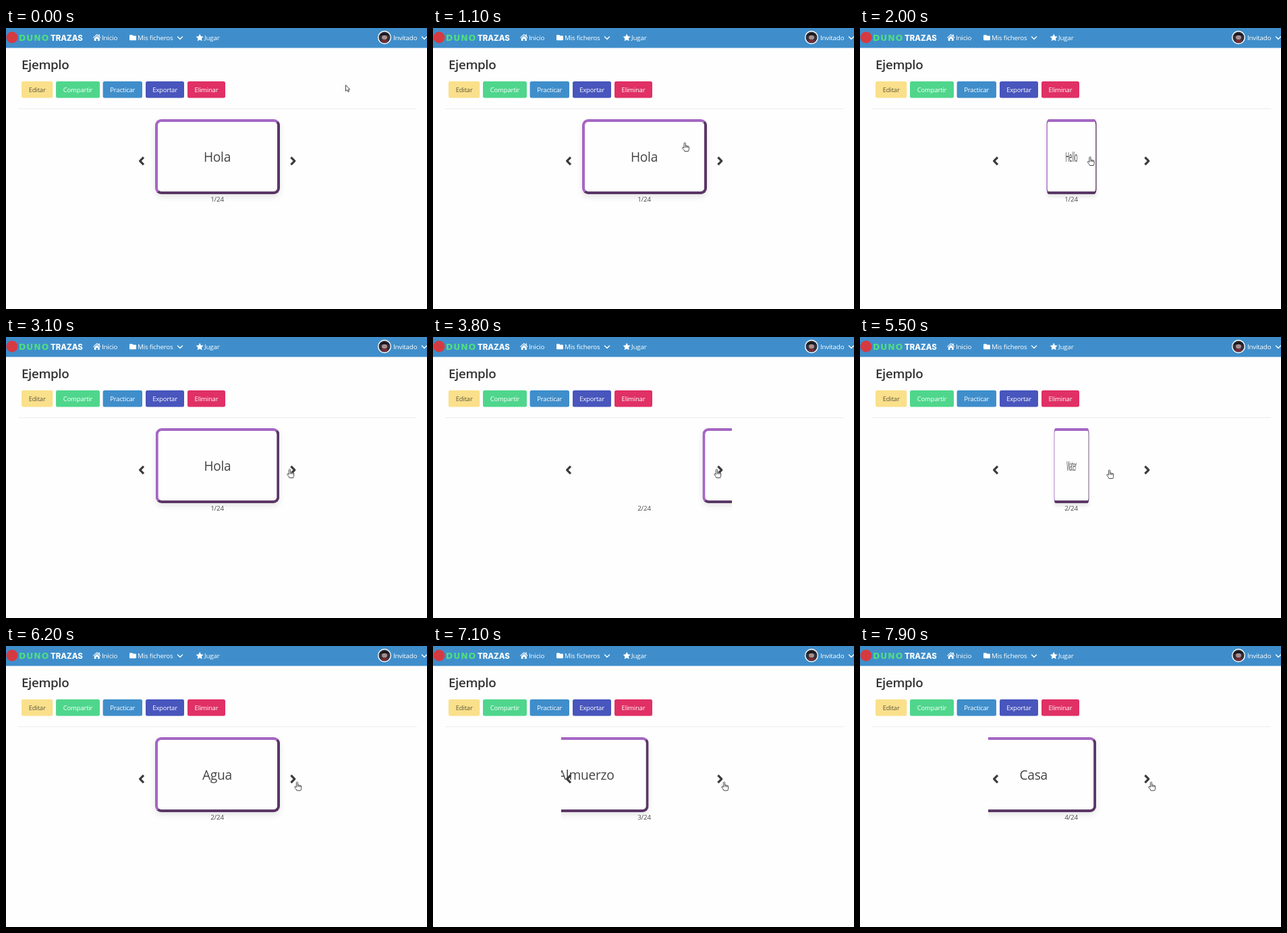
Animation of 624 by 416 pixels, one loop 8 s. Source, as an HTML page:

```html
<!DOCTYPE html>
<html lang="es">
<head>
<meta charset="utf-8">
<title>Ejemplo</title>
<style>
  html, body { margin: 0; width: 100%; height: 100%; overflow: hidden; background: #fefefe; }
  #stage { position: relative; width: 624px; height: 416px; overflow: hidden; }
  #clip { position: absolute; left: 190px; top: 122px; width: 253px; height: 142px; overflow: hidden; }
  #card {
    position: absolute; left: 30.5px; top: 12.5px; width: 185px; height: 111px; box-sizing: border-box;
    display: flex; align-items: center; justify-content: center;
    border: 4px solid; border-color: #a566c3 #5a3666 #5a3666 #a566c3; border-radius: 9px;
    background: #fefefe; box-shadow: 0 4px 9px rgba(60, 70, 60, .13);
    font: 19.2px "Open Sans", "Noto Sans", sans-serif; letter-spacing: -.015em; color: #444;
  }
  svg { position: absolute; left: 0; top: 0; }
  text { font: 9.8px "Open Sans", "Noto Sans", sans-serif; letter-spacing: -.02em; fill: #fff; }
  .btn { font-size: 9.5px; }
  .title { font-size: 18.8px; font-weight: 600; fill: #333; }
  .brand { font: bold 12.4px "DejaVu Sans", sans-serif; letter-spacing: 1px; fill: #4fe07f; }
  .brand2 { font: 800 11.4px Inter, sans-serif; letter-spacing: 0; }
  .line { fill: none; stroke: #fff; stroke-width: 1.4; stroke-linecap: round; stroke-linejoin: round; }
  .arrow { fill: none; stroke: #3b3b3b; stroke-width: 3.2; stroke-linejoin: round; }
  .cur { fill: #fff; stroke: #333; stroke-width: .9; stroke-linejoin: round; }
</style>
</head>
<body>
<div id="stage">
  <div id="clip"><div id="card"></div></div>
  <svg width="624" height="416" viewBox="0 0 624 416">
    <rect width="624" height="29.5" fill="#3f8ecb"/>
    <circle cx="9" cy="14" r="8.5" fill="#d53a41"/>
    <text class="brand" x="19" y="18.7">DUNO</text>
    <text class="brand2" x="66" y="18.5">TRAZAS</text>

    <path fill="#fff" d="M129 14.3 134.8 9 137.3 11.2V9.6H138.8V12.6L140.6 14.3 139.9 15.1 134.8 10.6 129.7 15.1ZM130.8 15.2 134.8 11.7 138.8 15.2V19H136V16H133.6V19H130.8Z"/>
    <text x="142" y="18">Inicio</text>
    <path fill="#fff" d="M184 10.3H187.2L188.5 11.5H192Q193 11.5 193 12.5V17.2Q193 18.2 192 18.2H184Q183 18.2 183 17.2V11.3Q183 10.3 184 10.3Z"/>
    <text x="195" y="18">Mis ficheros</text>
    <path class="line" d="M254.5 13 258 16.5 261.5 13"/>
    <path id="star" fill="#fff"/>
    <text x="294" y="18">Jugar</text>

    <circle cx="561" cy="14" r="9.3" fill="#30303a" stroke="#fff" stroke-width="1.4"/>
    <path fill="#15151c" d="M553.5 11.5Q561 3.5 568.5 11.5Q561 9.5 553.5 11.5Z"/>
    <ellipse cx="561" cy="14" rx="4" ry="3.2" fill="#a98d8b"/>
    <path fill="#7d2c38" d="M555.5 19.5Q561 14.8 566.5 19.5Q561 24 555.5 19.5Z"/>
    <text x="574" y="18">Invitado</text>
    <path class="line" d="M616.5 13 620 16.5 623.5 13"/>

    <text class="title" x="23" y="61">Ejemplo</text>
    <g id="buttons"></g>
    <path d="M18 119.5H609" stroke="#ededed"/>

    <path class="arrow" d="M204 191.3 198.6 196.8 204 202.3"/>
    <path class="arrow" d="M422.4 191.3 427.8 196.8 422.4 202.3"/>
    <text id="count" x="313" y="257" text-anchor="middle" style="fill:#4a4a4a"></text>

    <g id="cursor">
      <path id="point" class="cur" d="M0 0V9L2.1 7.1 3.6 10.2 5 9.5 3.6 6.5H6.2Z"/>
      <path id="hand" class="cur" d="M-1.1 1Q0 -.7 1.1 1V5Q2.1 4.2 2.9 5.2 4 4.5 4.6 5.7 6 5.2 6.2 6.7V9.4Q6.2 11 5.2 13H-.4Q-1.2 10.9 -3 9.2 -4.2 7.7 -3.2 7 -2.3 6.6 -1.1 8.1ZM1.1 5V7.5M2.9 5.4V7.6M4.6 5.8V7.8"/>
    </g>
  </svg>
</div>
<script>
const $ = id => document.getElementById(id);
const LOOP = 8000, STEP = 100;

// label, x, width, fill, text colour
const BUTTONS = [
  ["Editar", 23, 46.3, "#fae08b", "#5d573f"],
  ["Compartir", 74, 65, "#4fd68c", "#fff"],
  ["Practicar", 143.6, 58.4, "#3f8ecb", "#fff"],
  ["Exportar", 207, 57, "#4856bd", "#fff"],
  ["Eliminar", 269, 56, "#e03065", "#fff"]
];
$("buttons").innerHTML = BUTTONS.map(([label, x, w, bg, ink]) =>
  `<rect x="${x}" y="79" width="${w}" height="24.6" rx="2.5" fill="${bg}"/>` +
  `<text class="btn" x="${x + w / 2}" y="95" text-anchor="middle" style="fill:${ink}">${label}</text>`).join("");

$("star").setAttribute("d", "M" + Array.from({ length: 10 }, (_, i) => {
  const r = i % 2 ? 2.9 : 5.8, a = i * Math.PI / 5;
  return (287.2 + r * Math.sin(a)).toFixed(2) + " " + (14.6 - r * Math.cos(a)).toFixed(2);
}).join("L") + "Z");

const WORDS = [["Hola", "Hello"], ["Agua", "Water"], ["Almuerzo", "Lunch"], ["Casa", "House"]];
const FLIPS = [1780, 2650, 4610, 5350], FLIP = 600;
const SLIDES = [3440, 6290, 7034, 7850], SLIDE = 300, SHIFT = 253;

// time, x, y of the cursor tip
const PATH = [
  [0, 503.5, 84.5], [100, 503.5, 84.5], [1500, 341, 190.5], [2600, 341, 190.5],
  [3100, 420.5, 195.5], [4050, 420.5, 195.5], [4600, 369.5, 196.5],
  [5650, 369.5, 196.5], [6150, 431.5, 201], [LOOP, 431.5, 201]
];

const clamp = v => Math.min(1, Math.max(0, v));
const smooth = u => u * u * (3 - 2 * u);

function bezier(a, b, u) {
  return 3 * a * u * (1 - u) ** 2 + 3 * b * u * u * (1 - u) + u ** 3;
}

// cubic-bezier(.25, .1, .25, 1)
function ease(p) {
  p = clamp(p);
  let lo = 0, hi = 1;
  for (let i = 0; i < 24; i++) {
    const mid = (lo + hi) / 2;
    if (bezier(.25, .25, mid) < p) lo = mid; else hi = mid;
  }
  return bezier(.1, 1, lo);
}

function cursorAt(t) {
  const i = PATH.findIndex((p, k) => k && t <= p[0]);
  const [t0, x0, y0] = PATH[i - 1], [t1, x1, y1] = PATH[i];
  const u = smooth((t - t0) / (t1 - t0));
  return [x0 + (x1 - x0) * u, y0 + (y1 - y0) * u];
}

function draw(t) {
  let index = 0, shift = 0;
  for (const s of SLIDES) {
    if (t < s) break;
    if (t < s + SLIDE) shift = -SHIFT * ease((t - s) / SLIDE);
    else {
      index++;
      shift = SHIFT * (1 - ease((t - s - SLIDE) / SLIDE));
    }
  }
  const turn = Math.cos(Math.PI * FLIPS.reduce((sum, f) => sum + ease((t - f) / FLIP), 0));
  $("card").textContent = WORDS[index][turn < 0 ? 1 : 0];
  $("card").style.transform = `translateX(${shift}px) scaleX(${Math.abs(turn)})`;
  $("count").textContent = index + 1 + "/24";

  const [x, y] = cursorAt(t);
  const onCard = Math.abs(x - 313) < 93 && y > 135 && y < 246;
  const onArrow = x > 415 && x < 436 && y > 185 && y < 210;
  const hand = onCard || onArrow;
  $("cursor").setAttribute("transform", `translate(${x} ${y})`);
  $("hand").style.display = hand ? "" : "none";
  $("point").style.display = hand ? "none" : "";
}

const start = performance.now();
function tick() {
  const t = (performance.now() - start) % LOOP;
  draw(Math.floor(t / STEP) * STEP);
  requestAnimationFrame(tick);
}
tick();
</script>
</body>
</html>
```
